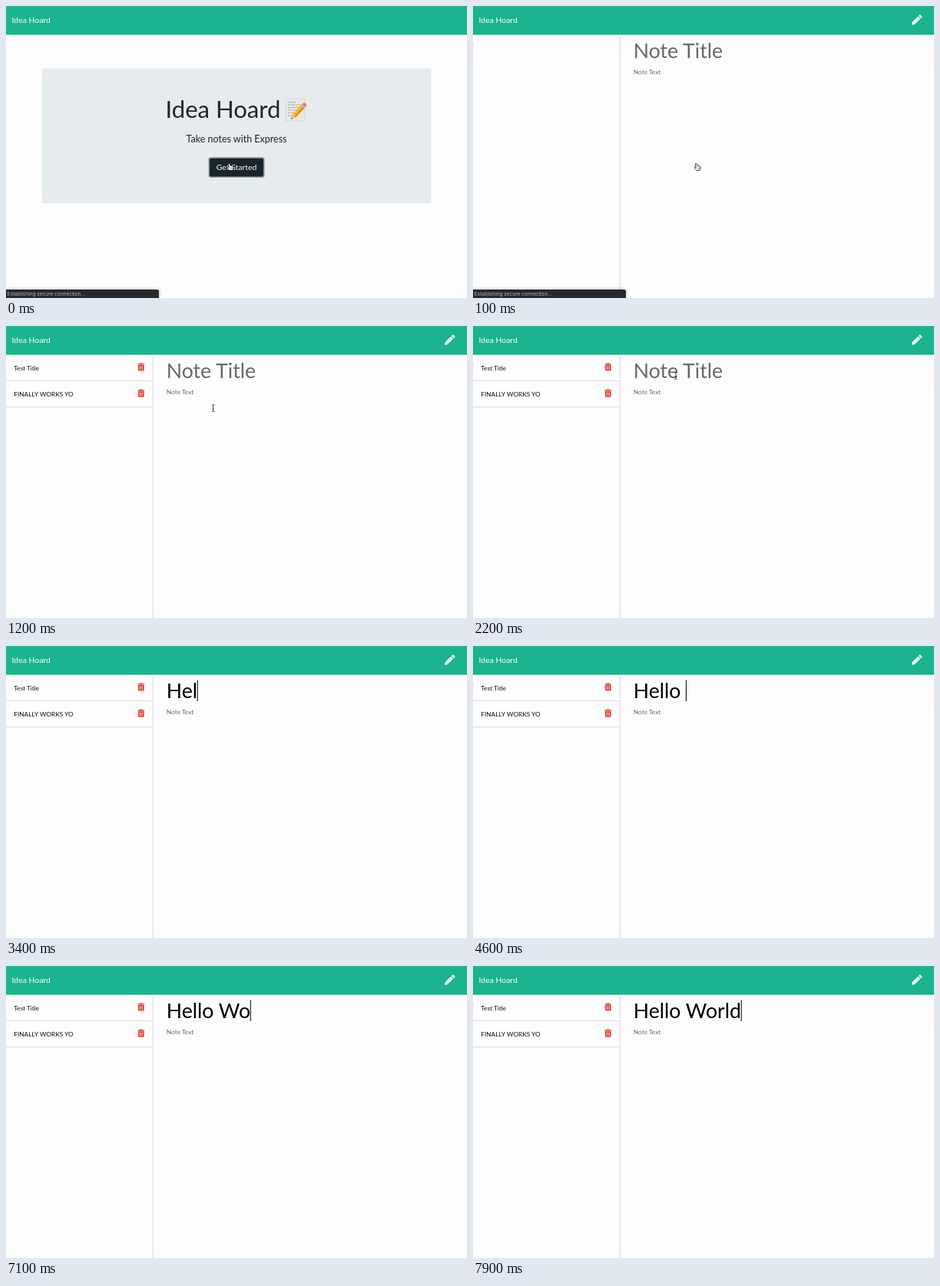
Recreate the animation shown at these times as an HTML page. Size 600x381 px, loop 8000 ms.

```html
<!DOCTYPE html>
<html lang="en">
<head>
<meta charset="utf-8">
<title>Notes</title>
<style>
  html, body { margin: 0; width: 100%; height: 100%; overflow: hidden; background: #fdfdfd; }
  svg { display: block; }
  text { font-family: Lato, sans-serif; white-space: pre; }
  .mid { text-anchor: middle; }
  .item { font-size: 8.33px; fill: #111; }
  .big { font-size: 26.67px; }
  .hint { fill: #686868; }
</style>
</head>
<body>
<svg width="600" height="381" viewBox="0 0 600 381">
  <defs>
    <filter id="soft" x="-10%" y="-80%" width="120%" height="260%">
      <feGaussianBlur stdDeviation="2"/>
    </filter>
    <g id="trash" fill="#dc4338">
      <path d="M0 1.2H2.7L3.2 .2H5.8L6.3 1.2H9V2.4H0Z"/>
      <path fill-rule="evenodd" d="M.6 3H8.4V9.4Q8.4 10.4 7.4 10.4H1.6Q.6 10.4 .6 9.4ZM2.3 4.2V9.2H2.9V4.2ZM4.2 4.2V9.2H4.8V4.2ZM6.1 4.2V9.2H6.7V4.2Z"/>
    </g>
  </defs>

  <rect width="600" height="381" fill="#fdfdfd"/>
  <rect width="600" height="37.6" fill="#1bb390"/>
  <text x="7.6" y="22.3" font-size="10.42" fill="#fff">Idea Hoard</text>

  <g id="home">
    <rect x="46.5" y="81.5" width="507" height="176" rx="2.5" fill="#e6ebed"/>
    <text x="207.5" y="146" font-size="31.1" fill="#212529">Idea Hoard</text>
    <g>
      <path d="M364 121H389V150H364Z" fill="#e9e9e4" stroke="#cfcfca" stroke-width=".6"/>
      <path d="M367 125.5H377M367 129H386M367 132.5H385M367 136H382M367 139.5H378M367 143H374" stroke="#a3a3a3" stroke-width="1" stroke-dasharray="3 .8 2 .7"/>
      <path d="M371 147.6L373 141.2L377 145.2Z" fill="#e8c08e"/>
      <path d="M371 147.6L371.7 145.3L373.2 146.9Z" fill="#444"/>
      <path d="M373 141.2L385.2 128.3L389.2 132.2L377 145.2Z" fill="#f5b52b"/>
      <path d="M375.6 143.8L387.8 130.8L389.2 132.2L377 145.2Z" fill="#d98a1c"/>
      <path d="M384.2 129.3L385.4 128.1L389.4 132L388.2 133.2Z" fill="#b9bcc0"/>
      <path d="M385.4 128.1L387 126.5Q388.4 125.4 390 127T391 130.3L389.4 132Z" fill="#e8796e"/>
    </g>
    <text class="mid" x="300" y="177.6" font-size="12.5" fill="#212529">Take notes with Express</text>
    <rect x="263.4" y="197.2" width="73.2" height="26.8" rx="3" fill="#8d9c9f"/>
    <rect x="265" y="198.8" width="70" height="23.6" rx="2" fill="#19242b"/>
    <text class="mid" x="300" y="214" font-size="10.42" fill="#fff">Get Started</text>
  </g>

  <g id="notes">
    <path d="M191.4 37.6V381" stroke="#e2e2e4" stroke-width="1.4"/>
    <g id="list">
      <path d="M0 71.5H191M0 105.7H191" stroke="#e0e0e2" stroke-width="1.2"/>
      <text class="item" x="10.2" y="57.8">Test Title</text>
      <text class="item" x="10.2" y="92">FINALLY WORKS YO</text>
      <use href="#trash" x="171.3" y="48"/>
      <use href="#trash" x="171.3" y="82.3"/>
    </g>
    <g transform="translate(571 11.4)" fill="#fff">
      <path d="M0 13.4L.7 9.6L8 2.3L11.1 5.4L3.8 12.7Z"/>
      <path d="M8.8 1.5L9.9 .4Q10.7 -.3 11.5 .4L13 1.9Q13.7 2.7 13 3.5L11.9 4.6Z"/>
    </g>
    <text id="title" class="big" x="208.7" y="68"></text>
    <rect id="caret" y="44.5" width="1" height="27.5" fill="#000"/>
    <text class="hint" x="208.8" y="89.4" font-size="8.33">Note Text</text>
  </g>

  <g id="status">
    <path d="M0 370H197Q199 370 199 372V381H0Z" fill="#000" opacity=".35" filter="url(#soft)"/>
    <path d="M0 370H196.5Q199 370 199 372.5V381H0Z" fill="#2a2930"/>
    <text x="1.6" y="378.3" font-size="6.5" fill="#b4b4b8" style="font-family:Inter,sans-serif">Establishing secure connection...</text>
  </g>

  <g id="hand" stroke="#222" stroke-width=".9" stroke-linejoin="round" fill="#fff">
    <path d="M-2.6 -4.2Q-1.9 -5.2 -1 -4.2L.3 -1.6L2.6 -1.4L4 -.4V2L3 4.6H-1L-3.6 1.6Q-4.4 .3 -3.3 0L-1.8 .6Z"/>
    <path d="M.4 .6V2.6M2 .6V2.6" stroke-width=".6"/>
  </g>
  <path id="beam" d="M-2 -4.5Q0 -4.5 0 -3.3Q0 -4.5 2 -4.5M0 -3.3V3.3M-2 4.5Q0 4.5 0 3.3Q0 4.5 2 4.5M-1 1.5H1" fill="none" stroke="#333" stroke-width=".9"/>
</svg>
<script>
  const LOOP = 8000, STEP = 100, BLINK = 500, LEFT = 208.7;
  const OPEN = 100, LOADED = 300, FADE = 300, FOCUS = 1700, TYPING = 3100;

  // [time, key]; "<" is a backspace
  const keys = [
    [3100, "H"], [3300, "e"], [3400, "l"], [3600, "l"], [4000, "o"], [4600, " "],
    [4900, "W"], [5100, "r"], [5200, "o"], [5400, "l"], [5600, "d"],
    [6200, "<"], [6400, "<"], [6600, "<"], [6900, "<"],
    [7100, "o"], [7400, "r"], [7600, "l"], [7900, "d"]
  ];
  // [time, x, y]
  const path = [[500, 292, 210], [900, 276, 154], [1600, 264, 65]];

  const $ = id => document.getElementById(id);
  const [home, notes, list, title, caret, status, hand, beam] =
    ["home", "notes", "list", "title", "caret", "status", "hand", "beam"].map($);
  const show = (el, on) => el.style.display = on ? "" : "none";
  const clamp = v => Math.max(0, Math.min(1, v));

  function typed(t) {
    let text = "", last = FOCUS;
    for (const [at, key] of keys) {
      if (at > t) break;
      text = key === "<" ? text.slice(0, -1) : text + key;
      last = at;
    }
    return { text, last };
  }

  function pointer(t) {
    let [, x, y] = path[0];
    for (let i = 1; i < path.length; i++) {
      const [t0, x0, y0] = path[i - 1], [t1, x1, y1] = path[i];
      if (t < t0) break;
      let p = clamp((t - t0) / (t1 - t0));
      if (i === path.length - 1) p *= 1.4 - .4 * p;
      x = x0 + (x1 - x0) * p;
      y = y0 + (y1 - y0) * p;
    }
    return [x, y];
  }

  function draw(now) {
    const t = Math.floor(now % LOOP / STEP) * STEP;
    show(home, t < OPEN);
    show(notes, t >= OPEN);
    show(list, t >= LOADED);
    status.style.opacity = 1 - clamp((t - LOADED) / FADE);

    const { text, last } = typed(t);
    title.textContent = text || "Note Title";
    title.setAttribute("fill", text ? "#000" : "#686868");
    show(caret, t >= FOCUS && (t - last) % (2 * BLINK) < BLINK);
    if (t >= OPEN) caret.setAttribute("x", LEFT + (text ? title.getComputedTextLength() - .3 : -.2));

    const moved = t > path[0][0];
    show(hand, !moved);
    show(beam, moved && t < TYPING);
    const at = `translate(${pointer(t)})`;
    hand.setAttribute("transform", at);
    beam.setAttribute("transform", at);
  }

  const start = performance.now();
  function tick() {
    draw(performance.now() - start);
    requestAnimationFrame(tick);
  }
  tick();
</script>
</body>
</html>
```
